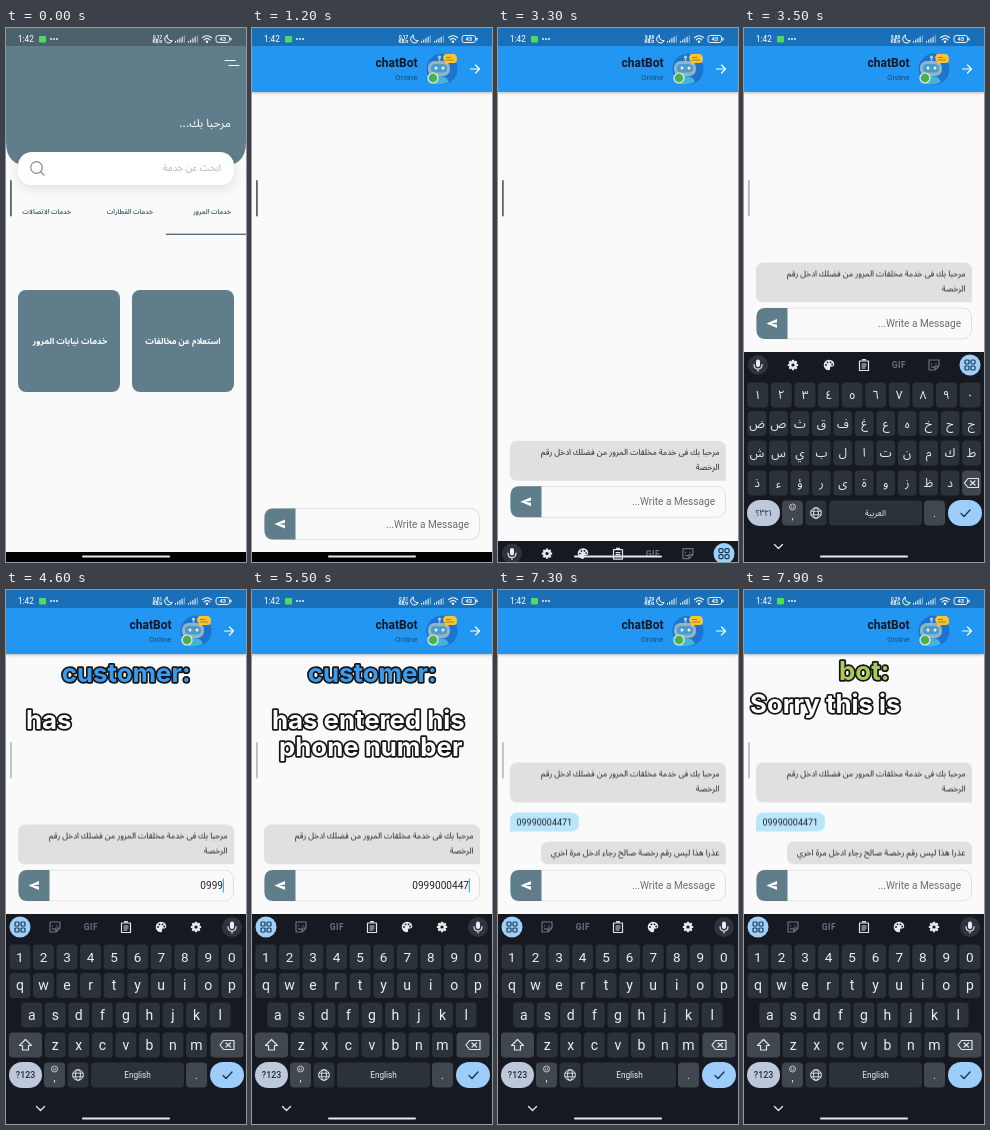
These frames come from a looping animation (240 by 534 pixels, 8 s). An HTML page:

```html
<!DOCTYPE html>
<html lang="ar">
<head>
<meta charset="utf-8">
<title>chatBot</title>
<style>
html, body { margin: 0; width: 100%; height: 100%; overflow: hidden; background: #fafafa; }
svg { display: block; width: 240px; height: 534px; }
text { font-family: Roboto, "Noto Sans Arabic", "DejaVu Sans", sans-serif; }
.rtl { direction: rtl; }
.mid { text-anchor: middle; }
.end { text-anchor: end; }
.line { fill: none; stroke-linecap: round; stroke-linejoin: round; }
.cap text {
  font: 700 25.8px Inter, "Open Sans", sans-serif; fill: #fff; stroke: #161616;
  stroke-width: 3.4px; stroke-linejoin: round; paint-order: stroke; white-space: pre;
}
.anim { animation: 8s linear infinite; }
.step { animation: 8s step-end infinite; }
#chat { animation-name: page; animation-timing-function: cubic-bezier(.2, 0, 0, 1); transform-origin: 120px 267px; }
#press { animation-name: press; }
#dock { animation-name: dock; animation-timing-function: ease-out; }
#keyboard { animation-name: keyboard; animation-timing-function: ease-out; }
#arabic { animation-name: until50; }
#english { animation-name: from50; }
#thread { animation-name: thread; }
#first { animation-name: first; }
#mine { animation-name: mine; }
#reply { animation-name: reply; }
#touch { animation-name: touch; }
#handle { animation-name: handle; }
@keyframes page {
  0%, 6% { opacity: 0; transform: scale(.88); }
  9.5%, 100% { opacity: 1; transform: none; }
}
@keyframes press { 0%, 1.2% { opacity: 0; } 2.5%, 5% { opacity: .18; } 7%, 100% { opacity: 0; } }
@keyframes dock { 0%, 41.1% { transform: none; } 43.5%, 100% { transform: translateY(-200.5px); } }
@keyframes keyboard { 0%, 41.1% { transform: translateY(212px); } 43.5%, 100% { transform: none; } }
@keyframes until50 { 0% { opacity: 1; } 50%, 100% { opacity: 0; } }
@keyframes from50 { 0% { opacity: 0; } 50%, 100% { opacity: 1; } }
@keyframes thread { 0% { opacity: 0; } 16.2%, 100% { opacity: 1; } }
@keyframes first {
  0% { transform: none; }
  87.4% { transform: translateY(-29px); }
  91.2%, 100% { transform: translateY(-62px); }
}
@keyframes mine {
  0% { opacity: 0; transform: none; }
  87.4% { opacity: 1; transform: none; }
  91.2%, 100% { opacity: 1; transform: translateY(-33px); }
}
@keyframes reply { 0% { opacity: 0; } 91.2%, 100% { opacity: 1; } }
@keyframes touch { 0% { opacity: 0; } 23.7% { opacity: 1; } 41.2%, 100% { opacity: 0; } }
@keyframes handle { 0%, 41.2% { opacity: 1; } 44%, 100% { opacity: .4; } }
</style>
</head>
<body>
<svg viewBox="0 0 240 534">
  <defs>
    <filter id="soft" x="-20%" y="-60%" width="140%" height="240%">
      <feDropShadow dx="0" dy="4" stdDeviation="6" flood-opacity=".1"/>
    </filter>
    <filter id="low" x="-10%" y="-20%" width="120%" height="150%">
      <feDropShadow dx="0" dy="1" stdDeviation="1.4" flood-opacity=".28"/>
    </filter>
  </defs>

  <g id="home">
    <rect width="240" height="534" fill="#fafafa"/>
    <path d="M0 0H240V114Q240 138 216 138H24Q0 138 0 114Z" fill="#607d8b"/>
    <rect width="240" height="18" fill="#4b626d"/>
    <path class="line" d="M219 32.5H229M223 37.5H233" stroke="#fff" stroke-width="1.1"/>
    <text class="rtl" x="225" y="99" font-size="11.8" font-weight="500" fill="#fff">مرحبا بك...</text>
    <rect x="12" y="124" width="216" height="33" rx="14" fill="#fff" filter="url(#soft)"/>
    <g class="line" stroke="#888" stroke-width="1.2"><circle cx="30.5" cy="139.5" r="5.8"/><path d="M35 144L38 147"/></g>
    <text class="rtl" x="215" y="143" font-size="9.5" fill="#b5b5b5">ابحث عن خدمة</text>
    <g class="rtl" font-size="6.4" font-weight="600" fill="#546e7a">
      <text x="225" y="186">خدمات المرور</text>
      <text x="147" y="186">خدمات القطارات</text>
      <text x="65" y="186">خدمات الاتصالات</text>
    </g>
    <rect x="160" y="205.6" width="80" height="1.4" fill="#56708a"/>
    <g fill="#607d8b">
      <rect x="12" y="262" width="102" height="102" rx="8"/>
      <rect x="126" y="262" width="102" height="102" rx="8"/>
    </g>
    <rect id="press" class="anim" x="126" y="262" width="102" height="102" rx="8" fill="#fff"/>
    <g class="rtl mid" font-size="8.4" font-weight="600" fill="#fff">
      <text x="64" y="315.500">خدمات نيابات المرور</text>
      <text x="177" y="315.500">استعلام عن مخالفات</text>
    </g>
  </g>

  <g id="chat" class="anim">
    <rect width="240" height="534" fill="#fafafa"/>
    <rect y="18" width="240" height="46" fill="#2196f3" filter="url(#low)"/>
    <rect width="240" height="18" fill="#1a70b8"/>
    <text class="end" x="165.500" y="38.800" font-size="12" font-weight="600" fill="#101820">chatBot</text>
    <text class="end" x="165.500" y="52" font-size="8" fill="#134f80">Online</text>
    <circle cx="190" cy="41" r="15.5" fill="#1d74cf"/>
    <path d="M179 55Q180 48 187.500 48T197 54Q189 58 179 55Z" fill="#45b3dc"/>
    <path d="M187.500 34V29" stroke="#9dbdcd" stroke-width="1.6"/>
    <circle cx="187.500" cy="29" r="1.6" fill="#b7cfda"/>
    <rect x="176" y="33" width="22" height="15" rx="6.500" fill="#91b4c6"/>
    <rect x="179" y="36" width="16" height="8.500" rx="4" fill="#4d9cc9"/>
    <g fill="#dff4ff"><circle cx="184" cy="40" r="1.500"/><circle cx="191" cy="40" r="1.500"/></g>
    <path d="M193 26H202Q205 27 205 31T202 35H197L193 37L193.500 34Q191 32 191 29Z" fill="#fcc52d"/>
    <path d="M194 29.500H199M194 32H202" stroke="#8c6d20" stroke-width=".8"/>
    <circle cx="181" cy="50" r="5" fill="#4caf50" stroke="#e5f3e7" stroke-width="1.2"/>
    <path class="line" d="M218.500 41H227.500M223.500 37L227.500 41L223.500 45" stroke="#fff" stroke-width="1.2"/>

    <g id="dock" class="anim">
      <g id="thread" class="step">
        <g id="first" class="step">
          <path d="M20 435H220Q228 435 228 443V475H20Q12 475 12 467V443Q12 435 20 435Z" fill="#e0e0e0"/>
          <g class="rtl" font-size="8.25" fill="#1c1c1c">
            <text x="221.500" y="449">مرحبا بك فى خدمة مخلفات المرور من فضلك ادخل رقم</text>
            <text x="221.500" y="464">الرخصة</text>
          </g>
        </g>
        <g id="mine" class="step">
          <path d="M20 456H73Q81 456 81 464V467Q81 475 73 475H12V464Q12 456 20 456Z" fill="#b8e7fc"/>
          <text id="sent" x="18.500" y="468.500" font-size="9" fill="#222"></text>
        </g>
        <g id="reply" class="step">
          <path d="M51 452H220Q228 452 228 460V475H51Q43 475 43 467V460Q43 452 51 452Z" fill="#e0e0e0"/>
          <text class="rtl" x="221.500" y="465.500" font-size="8.5" fill="#1c1c1c">عذرا هذا ليس رقم رخصة صالح رجاء ادخل مرة اخري</text>
        </g>
      </g>
      <rect x="12.500" y="480.500" width="215" height="31" rx="9" fill="#fafafa" stroke="#dedede"/>
      <path d="M21.500 480.500H43.500V511.500H21.500Q12.500 511.500 12.500 502.500V489.500Q12.500 480.500 21.500 480.500Z" fill="#607d8b"/>
      <path d="M22.500 496L33 491.500V495L27 496L33 497V500.500Z" fill="#fff"/>
      <text id="field" class="end" x="217" y="499.500" font-size="10.1"></text>
      <path id="caret" d="M217.300 489V503" stroke="#2196f3"/>
    </g>
  </g>

  <rect y="524" width="240" height="10" fill="#000"/>
  <g id="keyboard" class="anim">
    <rect y="324" width="240" height="210" fill="#161a20"/>
    <g id="arabic" class="step"></g>
    <g id="english" class="step"></g>
    <path class="line" d="M30.500 516.500L34.500 520.500L38.500 516.500" stroke="#e4e8ec" stroke-width="1.3"/>
  </g>
  <rect x="76" y="527.500" width="88" height="2" rx="1" fill="#e8e8e8"/>

  <g fill="#fff">
    <text x="12" y="14" font-size="8.200">1:42</text>
    <rect x="33" y="8" width="7" height="6.500" rx="1" fill="#4fd964"/>
    <circle cx="45" cy="11" r=".9"/><circle cx="48" cy="11" r=".9"/><circle cx="51" cy="11" r=".9"/>
    <g class="mid" font-size="4.600" font-weight="600"><text id="speed" x="151.500" y="10.800"></text><text x="151.500" y="15">KB/s</text></g>
    <path class="line" d="M161 7.300A4 4 0 1 0 166.200 12.700A4.600 4.600 0 0 1 161 7.300Z" stroke="#fff"/>
    <g id="signals"></g>
    <g class="line" stroke="#fff" stroke-width="1.1"><path d="M196.500 9.700Q201 5.800 205.500 9.700M198.200 11.800Q201 9.300 203.800 11.800"/></g>
    <circle cx="201" cy="13.800" r="1.200"/>
    <rect x="210" y="7.500" width="13.500" height="7" rx="2.200" fill="none" stroke="#fff" stroke-width=".9"/>
    <rect x="224.300" y="9.500" width="1.200" height="3" rx=".5"/>
    <text class="mid" x="216.800" y="13" font-size="5.800" font-weight="600">43</text>
  </g>
  <rect id="handle" class="anim" x="4" y="152" width="1.800" height="36.500" rx=".9" fill="#606366"/>
  <circle id="touch" class="step" cx="164.500" cy="492" r="7" fill="#b4c2cc" fill-opacity=".12" stroke="#8c9aa4" stroke-opacity=".5"/>

  <g class="cap">
    <text id="title" class="mid" x="120.200"></text>
    <text id="row0"></text>
    <text id="row1"></text>
  </g>
</svg>
<script>
const $ = id => document.getElementById(id);
const LOOP = 8000, CHAR_MS = 30;
const NUMBER = '09990004471';
const SPEEDS = [[0, '0.17'], [1900, '9.88'], [4200, '0.91'], [6000, '0.29']];
const CAPTIONS = [
  { from: 1385, to: 3300, title: 'bot:', color: '#abc957', y: 99,
    rows: [[22, 137.5, 'Ask for Driving '], [24, 164.5, 'license number']] },
  { from: 4495, to: 7000, title: 'customer:', color: '#3b9bef', y: 92,
    rows: [[20, 138.5, 'has entered his '], [27, 165.5, 'phone number']] },
  { from: 7495, to: 8000, title: 'bot:', color: '#abc957', y: 89.5,
    rows: [[6, 123, 'Sorry this is not '], [28, 150, '']] }
];

// Keyboard parts
const KEY = '#2c3239', KEY_ALT = '#40474f';
const key = (x, y, w, label = '', size = 13, fill = KEY) =>
  `<rect x="${x - w / 2}" y="${y - 12.5}" width="${w}" height="25" rx="4" fill="${fill}"/>
   <text class="mid" x="${x}" y="${y + size * .35}" font-size="${size}" fill="#eceff2">${label}</text>`;
const row = (chars, first, pitch, y, size) =>
  [...chars].map((c, i) => key(first + i * pitch, y, pitch - 2.6, c, size)).join('');
const stroke = (d, color = '#dfe5ea', w = 1.2) =>
  `<path class="line" d="${d}" stroke="${color}" stroke-width="${w}"/>`;
const at = (x, y, body) => `<g transform="translate(${x} ${y})">${body}</g>`;
const backspace = (x, w) => key(x, 455, w, '', 13, KEY_ALT) +
  at(x, 455, stroke('M-7 0L-3.500 -4.500H7V4.500H-3.500ZM-1 -2L3.500 2M3.500 -2L-1 2'));

const teeth = [...Array(8).keys()].map(i =>
  `<rect x="-1.1" y="-5.2" width="2.2" height="3" rx=".4" transform="rotate(${i * 45})"/>`).join('');
const squares = [-3, 3].flatMap(x => [-3, 3].map(y =>
  `<rect x="${x - 2}" y="${y - 2}" width="4" height="4" rx="1" fill="none" stroke="#173a58" stroke-width="1.2"/>`)).join('');
const TOOLS = [
  '<circle r="10" fill="#2d343c"/><rect x="-2" y="-5.500" width="4" height="7.500" rx="2" fill="#eceff2"/>' +
    stroke('M-4 -.5Q-4 4 0 4T4 -.5M0 4V6'),
  `<g fill="#e6eaee">${teeth}<circle r="3.900"/></g><circle r="1.600" fill="#161a20"/>`,
  '<path d="M0 -5.300A5.300 5.300 0 0 0 0 5.300Q1.800 5 1 3Q1 1.500 3 1.600Q5.300 1.500 5.300 -.5Q5 -5 0 -5.300Z" fill="#e6eaee"/>' +
    '<g fill="#161a20"><circle cx="-3" cy="0" r=".9"/><circle cx="-1.500" cy="-2.700" r=".9"/><circle cx="1.500" cy="-2.700" r=".9"/><circle cx="3.200" cy="-.5" r=".9"/></g>',
  stroke('M-4.500 -4H4.500V5.500H-4.500ZM-1.500 -5.300H1.500M-2 -1H2M-2 1H2M-2 3H1'),
  '<text class="mid" y="3" font-size="8.500" font-weight="600" letter-spacing=".5" fill="#69727a">GIF</text>',
  stroke('M-5 -5H5V1L1 5H-5ZM5 1H1V5M-2.500 -1.500V-1M2 -1.500V-1M-2.500 1.500Q-1 3 1 1.500', '#69727a'),
  `<circle r="10.500" fill="#a0d0f8"/>${squares}`
];
const toolbar = flip => TOOLS.map((icon, i) =>
  at([14, 49, 85, 120, 155, 190, 226][flip ? 6 - i : i], 337, icon)).join('');

const bottomRow = (mode, space) =>
  `<rect x="3" y="472" width="33" height="26" rx="13" fill="#bdc9db"/>
   <text class="mid" x="19.5" y="488" font-size="8.8" font-weight="500" fill="#1c2c3a">${mode}</text>` +
  key(48.5, 485, 21, '', 13, KEY_ALT) +
  at(48.5, 479, '<circle r="3" fill="none" stroke="#dfe5ea" stroke-width=".8"/>' +
    stroke('M-1.300 .7Q0 2 1.300 .7M-1 -.8V-.7M1 -.8V-.7', '#dfe5ea', .7)) +
  '<text class="mid" x="48.500" y="491" font-size="11" fill="#eceff2">,</text>' +
  key(72, 485, 21) +
  at(72, 485, '<circle r="5.300" fill="none" stroke="#dfe5ea"/><ellipse rx="2.400" ry="5.300" fill="none" stroke="#dfe5ea"/>' +
    stroke('M-5 -1.800H5M-5 1.800H5', '#dfe5ea', .9)) +
  key(131.5, 485, 93, space, 8.2) + key(190.5, 485, 21, '.', 11, KEY_ALT) +
  '<rect x="204" y="472" width="34" height="26" rx="13" fill="#9dcdfa"/>' +
  stroke('M217 485.500L220 488.500L226 482', '#173a58', 1.4);

$('arabic').innerHTML = toolbar(false) +
  row('١٢٣٤٥٦٧٨٩٠', 13.7, 23.6, 367, 12) +
  row('ضصثقفغعهخحج', 13, 21.45, 395.5, 12) +
  row('شسيبلاتنمكط', 13, 21.45, 425, 12) +
  row('ذءؤرىةوزظد', 13, 21.45, 455, 12) +
  backspace(227.5, 18.8) +
  bottomRow('٣٢١؟', 'العربية');
$('english').innerHTML = toolbar(true) +
  row('1234567890', 13.9, 23.55, 367, 13.5) +
  row('qwertyuiop', 13.9, 23.55, 395.5, 14) +
  row('asdfghjkl', 25.7, 23.55, 425, 14) +
  key(19.5, 455, 33, '', 13, KEY_ALT) +
  at(19.5, 455, stroke('M0 -5.500L6 .5H3V5H-3V.5H-6Z')) +
  row('zxcvbnm', 49.2, 23.55, 455, 14) +
  backspace(221, 33) +
  bottomRow('?123', 'English');

$('signals').innerHTML = [169, 182].map(x => [0, 1, 2, 3, 4].map(i =>
  `<rect x="${x + i * 2.2}" y="${13 - i * 1.4}" width="1" height="${1.6 + i * 1.4}" opacity="${i > 3 ? .5 : 1}"/>`
).join('')).join('');
$('sent').textContent = NUMBER;

function setText(el, value) {
  if (el.textContent !== value) el.textContent = value;
}

function drawCaption(t) {
  const cap = CAPTIONS.find(c => t >= c.from && t < c.to);
  setText($('title'), cap ? cap.title : '');
  let left = cap ? Math.floor((t - cap.from) / CHAR_MS) : 0;
  for (const i of [0, 1]) {
    const [x, y, words] = cap ? cap.rows[i] : [0, 0, ''];
    const el = $('row' + i);
    el.setAttribute('x', x);
    el.setAttribute('y', y);
    setText(el, words.slice(0, Math.max(0, left)));
    left -= words.length;
  }
  if (cap) {
    $('title').setAttribute('y', cap.y);
    $('title').style.fill = cap.color;
  }
}

function drawField(t) {
  const count = t < 6300 ? Math.max(0, Math.floor((t - 4120) / 150) + 1) : 0;
  const typed = NUMBER.slice(0, count);
  setText($('field'), typed || '...Write a Message');
  $('field').setAttribute('fill', typed ? '#222' : '#6c6c6c');
  $('caret').style.opacity = typed ? 1 : 0;
}

const start = performance.now();
function frame() {
  const t = (performance.now() - start) % LOOP;
  setText($('speed'), SPEEDS.filter(s => t >= s[0]).pop()[1]);
  drawCaption(t);
  drawField(t);
  requestAnimationFrame(frame);
}
frame();
</script>
</body>
</html>
```
